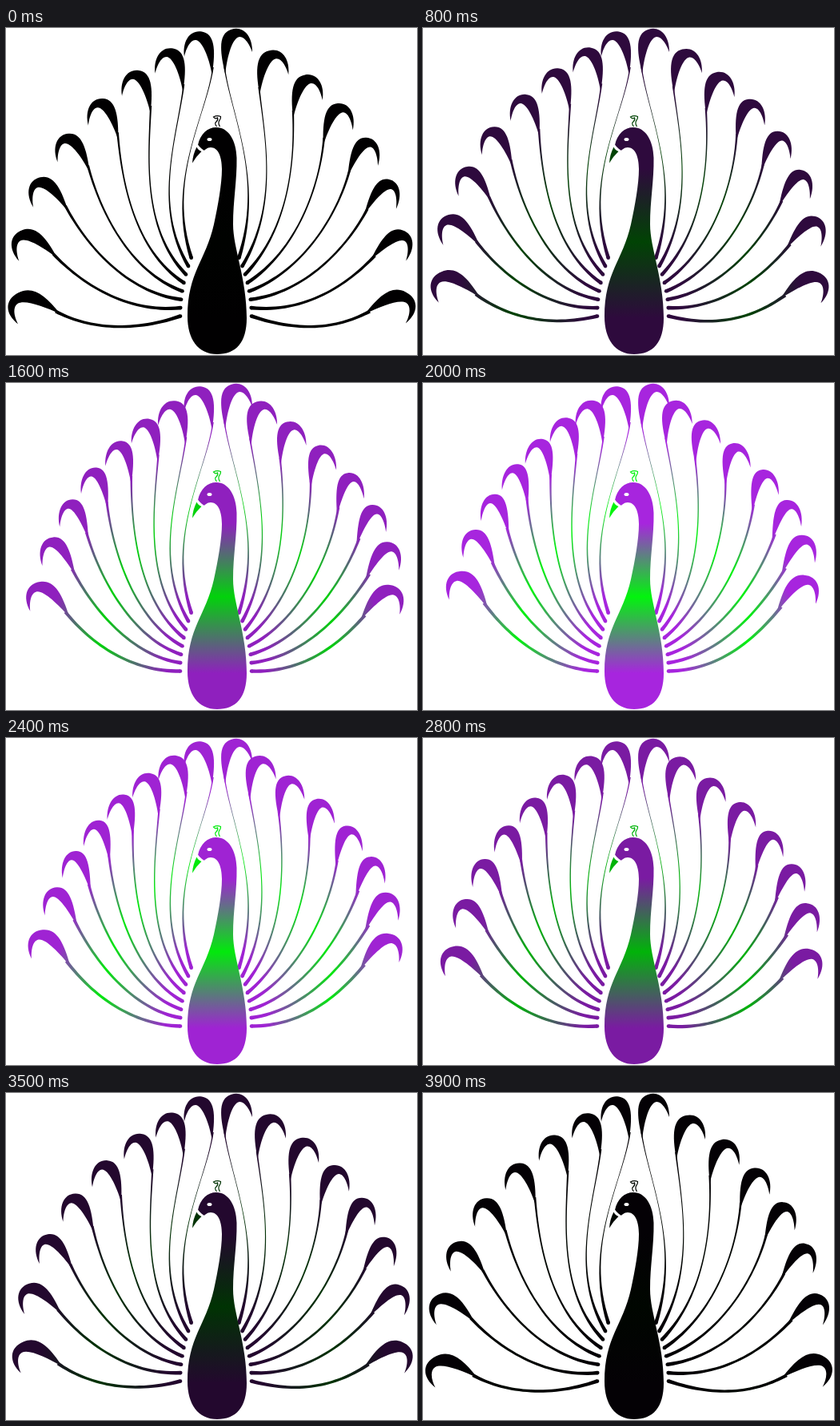
An HTML page with a canvas for the animation above (4 s loop, 514 by 408 pixels).

```html
<!DOCTYPE html>
<html lang="en">
<head>
<meta charset="utf-8">
<title>Peacock</title>
<style>
  html, body { margin: 0; width: 100%; height: 100%; overflow: hidden; background: #fff; }
  canvas { display: block; }
</style>
</head>
<body>
<canvas id="stage" width="514" height="408"></canvas>
<script>
const ctx = document.getElementById('stage').getContext('2d');
const LOOP = 4000, STEP = 100, FEATHERS = 8;

// Four key feathers shape each half of the fan; the rest lie on cubics through them.
const KEYS = [0, 2, 5, 7];
const FANS = [
  {
    side: 1, baseX: 218, spread: .28,
    tip: { x: [15, 34, 145, 223], y: [370, 224, 85, 36] },
    neck: { x: [62, 74, 181, 259], y: [354, 222, 97, 49] },
    drift: { x: [18, 39, 14, 0], y: [-100, -52, -11, 0] }
  },
  {
    side: -1, baseX: 307, spread: -.32,
    tip: { x: [500, 488, 396, 308], y: [369, 226, 90, 30] },
    neck: { x: [455, 452, 359, 273], y: [354, 226, 103, 48] },
    drift: { x: [-9, -15, -24, 0], y: [-94, -47, -14, 0] }
  }
];

const BODY = new Path2D(`M240 146 C243 132 252 124 263 124 C278 124 288 140 288.500 162
  C289 190 284 215 284 245 C284 275 301 312 301 362 C301 392 288 407 264 407
  C240 407 227 388 227 360 C227 305 250 290 260 245 C265 222 270 195 270 176
  C270 160 265 149 256 149 C251 149 250 152 247 153 Z`);
const BEAK = new Path2D('M238.500 148.500 Q240 152 244.500 154 Q238 160 233 168.500 Q233.500 158 238.500 148.500 Z');
const CREST = new Path2D(`M263.500 123 C258 116 267 118 264.500 112 Q262 114 259.500 111
  Q264 108.500 268.500 110.500 Q269 113 266.500 116 Q265 119 267.500 123`);

const radians = deg => deg * Math.PI / 180;
const shade = (r, g, b, k) => `rgb(${Math.round(r * k)},${Math.round(g * k)},${Math.round(b * k)})`;

function through(values, i) {
  return values.reduce((sum, v, a) => sum + v * KEYS.reduce(
    (w, k, b) => b === a ? w : w * (i - k) / (KEYS[a] - k), 1), 0);
}
const place = (path, i) => [through(path.x, i), through(path.y, i)];

function gradient([x0, y0], [x1, y1], stops, colors) {
  const g = ctx.createLinearGradient(x0, y0, x1, y1);
  stops.forEach((at, i) => g.addColorStop(at, colors[i % 2]));
  return g;
}

function crescent([tx, ty], [nx, ny], end, side) {
  const ux = nx - tx, uy = ny - ty, bulge = side * 37 / Math.hypot(ux, uy);
  const at = (a, h) => [tx + a * ux + h * bulge * uy, ty + a * uy - h * bulge * ux];
  ctx.beginPath();
  ctx.moveTo(tx, ty);
  ctx.bezierCurveTo(...at(-.24, .47), ...at(-.13, .93), ...at(.26, 1));
  ctx.bezierCurveTo(...at(.66, 1.08), ...at(.89, .63), ...end);
  ctx.bezierCurveTo(...at(.76, .28), ...at(.36, .72), ...at(.16, .66));
  ctx.bezierCurveTo(...at(-.02, .6), ...at(-.03, .23), tx, ty);
  ctx.fill();
}

// Tapered stem: slender in the middle, thick at the base.
function stem(points, slim) {
  const near = [], far = [];
  for (let t = 0; t <= 1; t += 1 / 32) {
    const s = 1 - t;
    const [x, y, dx, dy] = [0, 1, 2, 3].map(n => {
      const [a, b, c, d] = points.map(p => p[n % 2]);
      return n < 2
        ? s * s * s * a + 3 * s * s * t * b + 3 * s * t * t * c + t * t * t * d
        : s * s * (b - a) + 2 * s * t * (c - b) + t * t * (d - c);
    });
    const half = (slim + (4.6 - slim) * t ** 4 + s ** 6) / 2 / Math.hypot(dx, dy);
    near.push([x - dy * half, y + dx * half]);
    far.unshift([x + dy * half, y - dx * half]);
  }
  ctx.beginPath();
  near.concat(far).forEach(p => ctx.lineTo(...p));
  ctx.fill();
  ctx.beginPath();
  ctx.arc(...points[3], 2.3, 0, 2 * Math.PI);
  ctx.fill();
}

function feather(fan, i, amount, colors) {
  const { side } = fan, outer = 1 - i / (FEATHERS - 1);
  const base = [fan.baseX + fan.spread * i * i, 359.5 - 10.4 * i];
  const drift = place(fan.drift, i);
  // The closer to the head, the further a point travels.
  const move = (p, share) => p.map((v, n) => v + drift[n] * share * amount);
  const offset = ([x, y], angle, length) =>
    [x + side * Math.sin(radians(angle)) * length, y + Math.cos(radians(angle)) * length];

  const neckRest = place(fan.neck, i);
  const tip = move(place(fan.tip, i), 1);
  const neck = move(neckRest, .8);
  const bend = move(offset(neckRest, 70 * outer ** 2 - 8, 62 - 20 * outer ** 3), .55);
  const root = move(offset(base, -71 - 13 * i, 68 + .1 * i ** 3), .25);
  const end = neck.map((v, n) => v + (bend[n] - v) * .15);

  ctx.fillStyle = gradient(tip, base, [.12, .48, .92], colors);
  crescent(tip, neck, end, side);
  stem([neck, bend, root, base], 3.2 - i * .38);
}

function bird(colors) {
  const green = colors[1];
  ctx.fillStyle = gradient([0, 175], [0, 362], [0, .49, 1], colors);
  ctx.fill(BODY);
  ctx.fillStyle = green;
  ctx.fill(BEAK);
  ctx.strokeStyle = '#fff';
  ctx.lineWidth = 1.5;
  ctx.beginPath();
  ctx.moveTo(239, 145);
  ctx.quadraticCurveTo(241, 151, 247, 153);
  ctx.stroke();
  ctx.fillStyle = '#fff';
  ctx.beginPath();
  ctx.ellipse(254.5, 139, 3, 2.1, 0, 0, 2 * Math.PI);
  ctx.fill();
  ctx.strokeStyle = green;
  ctx.lineWidth = 1.2;
  ctx.stroke(CREST);
}

function draw(now) {
  const step = Math.floor((now % LOOP) / STEP);
  const amount = (1 - Math.cos(2 * Math.PI * (step - 1) * STEP / LOOP)) / 2;
  const colors = [shade(168, 37, 223, amount), shade(2, 246, 13, amount)];
  ctx.fillStyle = '#fff';
  ctx.fillRect(0, 0, 514, 408);
  for (const fan of FANS) {
    for (let i = 0; i < FEATHERS; i++) feather(fan, i, amount, colors);
  }
  bird(colors);
}

let start;
function tick(now) {
  start ??= now;
  draw(now - start);
  requestAnimationFrame(tick);
}
draw(0);
requestAnimationFrame(tick);
</script>
</body>
</html>
```
